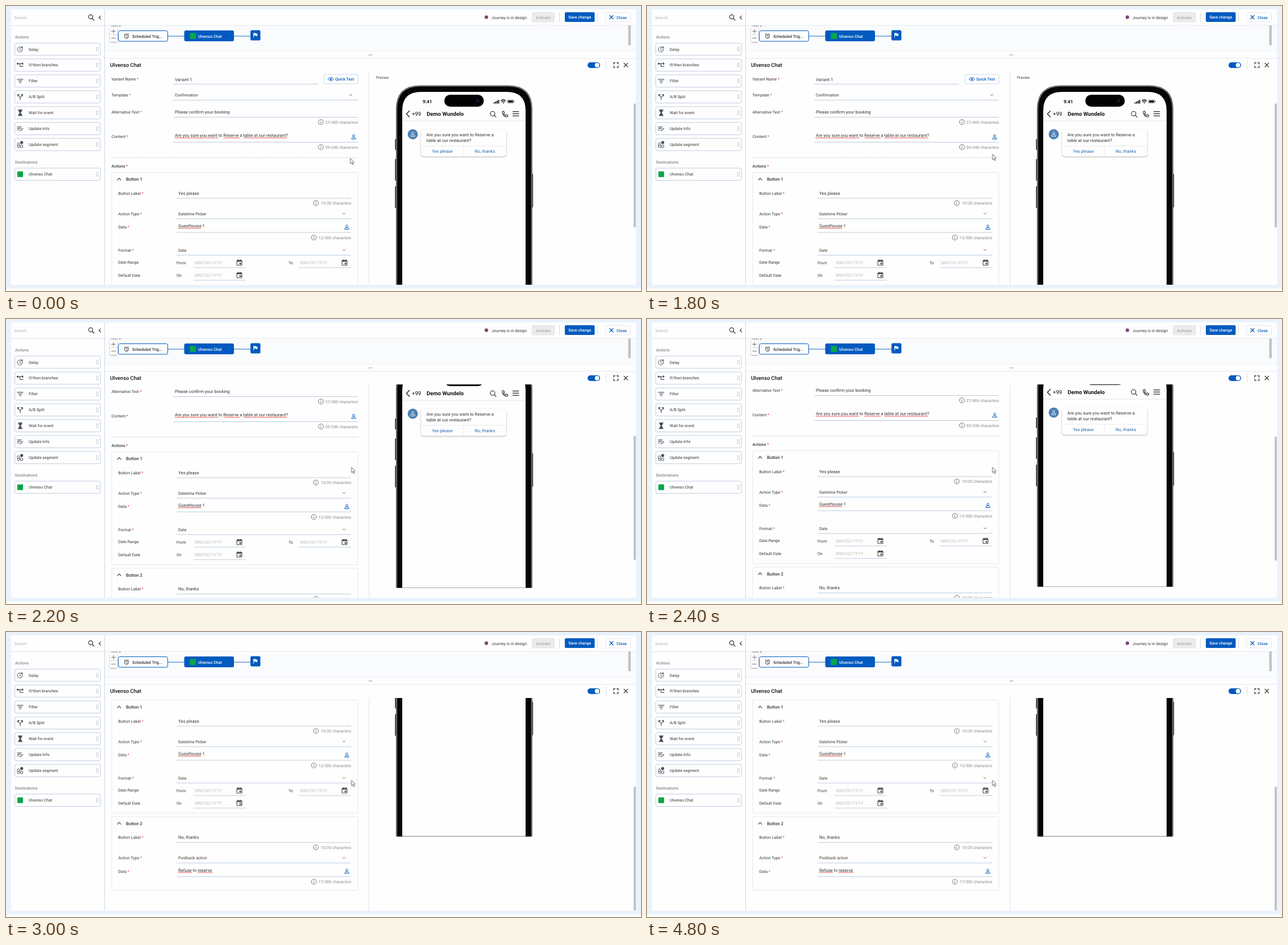
An HTML page that plays this animation: 1117x501 px, repeating every 5000 ms.

```html
<!DOCTYPE html>
<html lang="en">
<head>
<meta charset="utf-8">
<title>Journey editor</title>
<style>
  html, body { margin: 0; width: 100%; height: 100%; overflow: hidden; background: #eaf3fc; }
  svg { display: block; width: 1117px; height: 501px; text-rendering: geometricPrecision; }
  text { font-family: Roboto, sans-serif; fill: #333; white-space: pre; }
  .ln { fill: none; stroke-linecap: round; stroke-linejoin: round; }
</style>
</head>
<body>
<svg id="stage" viewBox="0 0 1117 501" xmlns="http://www.w3.org/2000/svg"></svg>
<script>
const BLUE = '#005abf', DARK = '#4a4f57', RULE = '#b4c7dc';
const LOOP = 5000;
const BRAND = 'Ulvenso Chat';

// y is the middle of the line of text
const text = (x, y, s, { size = 7.05, color = '#333', weight = 400, anchor = 'start' } = {}) =>
  `<text x="${x}" y="${y + size * 0.36}" font-size="${size}" font-weight="${weight}" text-anchor="${anchor}" style="fill:${color}">${s}</text>`;
const value = (x, y, s, color) => text(x, y, s, { size: 7.65, color });
const label = (x, y, s, weight) => text(x, y, `${s}<tspan style="fill:#e5343d"> *</tspan>`, { weight });
const rect = (x, y, w, h, fill, r = 0, stroke = 'none', extra = '') =>
  `<rect x="${x}" y="${y}" width="${w}" height="${h}" rx="${r}" fill="${fill}" stroke="${stroke}" ${extra}/>`;
const path = (d, color = DARK, w = 1, extra = '') =>
  `<path class="ln" d="${d}" stroke="${color}" stroke-width="${w}" ${extra}/>`;
const hline = (x1, x2, y, color = RULE) => rect(x1, y - 0.45, x2 - x1, 0.9, color);
const vline = (x, y1, y2, color) => rect(x - 0.5, y1, 1, y2 - y1, color);
const dash = (x, y1, y2) => path(`M${x} ${y1}V${y2}`, '#b8bec6', 0.9, 'stroke-dasharray="1.2 2.2"');
const circle = (x, y, r, fill, stroke = 'none', w = 1) =>
  `<circle cx="${x}" cy="${y}" r="${r}" fill="${fill}" stroke="${stroke}" stroke-width="${w}"/>`;
const at = (x, y, s) => `<g transform="translate(${x} ${y})">${s}</g>`;

const down = (x, y) => path(`M${x - 2} ${y - 1}l2 2l2 -2`, '#555', 0.95);
const up = (x, y) => path(`M${x - 3} ${y + 1.6}l3 -3.2l3 3.2`, '#333', 1.1);
const cross = (x, y, r, color, w) => path(`M${x - r} ${y - r}l${2 * r} ${2 * r}m0 ${-2 * r}l${-2 * r} ${2 * r}`, color, w);
const person = (x, y, color = BLUE) =>
  at(x, y, circle(0, -1.8, 1.8, 'none', color, 1) + path('M-3.5 3.6v-1q0 -1.5 3.5 -1.5t3.5 1.5v1z', color, 1));
const counter = (icon, right, y, s) =>
  circle(icon, y, 4.4, 'none', '#666', 0.9) + rect(icon - 0.5, y - 0.5, 1, 2.8, '#666') + rect(icon - 0.5, y - 2.3, 1, 1, '#666') +
  text(right, y, `${s} characters`, { color: '#868686', anchor: 'end' });
const calendar = (x, y) => at(x, y,
  rect(-4.4, -4, 8.8, 8.8, 'none', 1, '#444', 'stroke-width="1.1"') + rect(-4.4, -4, 8.8, 2.4, '#444') +
  rect(-3, -5.4, 1.2, 2, '#444') + rect(1.8, -5.4, 1.2, 2, '#444') + rect(0.2, 0.4, 2.8, 2.8, '#444'));
const squiggle = (x1, x2, y) =>
  path(`M${x1} ${y}` + 'l1 -1.3l1 1.3'.repeat(Math.round((x2 - x1) / 2)), '#e8372c', 0.75);
const select = (y, x1, x2, tx, s) => text(tx, y, s) + down(x2 - 12.5, y) + hline(x1, x2, y + 9);

const icons = [
  circle(-0.6, 0.4, 4.4, 'none', DARK) + path('M-0.6 -2v2.6l2 1.2M3 -5v3M1.5 -3.5h3'),
  path('M-5 -2.6h10M-5 -2.6h3q1.5 0 1.5 2.8t1.5 2.2h4M3.6 -4.2l1.6 1.6l-1.6 1.6', DARK, 1.2) + rect(-6, -4, 2.8, 2.8, DARK),
  path('M-5 -3h10M-3 0h6M-1.2 3h2.4', DARK, 1.3),
  path('M0 5V1.5L-4.2 -4M0 1.5L4.2 -4M-4.2 -1.4v-2.8h2.6M4.2 -1.4v-2.8h-2.6', DARK, 1.2),
  path('M-3.5 -5h7M-3.5 5h7', DARK, 1.3) + `<path d="M-2.8 -5h5.6v2.5L.8 0L2.8 2.5V5h-5.6V2.5L-.8 0L-2.8 -2.5z" fill="${DARK}"/>`,
  path('M-5 -3h7M-5 -0.3h6M-5 2.4h3M0 4l4.6 -4.4', DARK, 1.2),
  circle(2.6, -3.6, 2.6, DARK) + circle(-3, -0.8, 2.2, 'none', DARK) + circle(-2.8, 3.2, 2.2, 'none', DARK) + circle(2.4, 3.2, 2.4, 'none', DARK),
  rect(-5, -5, 10, 10, '#0aa64a', 1)
];
const item = (y, s, icon) => {
  let grip = '';
  for (let i = 0; i < 8; i++) grip += rect(158.9 + (i % 2) * 2.6, y - 3.9 + (i >> 1) * 2.2, 1.2, 1.2, '#a9b0b8');
  return rect(15.5, y - 10.8, 150.5, 21.6, '#fefefe', 2.5, '#b7c9de', 'stroke-width=".9"') + at(25, y, icon) + text(40, y, s) + grip;
};

function sidebar() {
  const names = ['Delay', 'If/then branches', 'Filter', 'A/B Split', 'Wait for event', 'Update Info', 'Update segment'];
  return text(14.5, 20.5, 'Search', { color: '#b4b4b4' }) +
    circle(149, 19, 3.6, 'none', '#333', 1.2) + path('M151.8 21.8l3.2 3.2', '#333', 1.3) + path('M166.3 17.4l-2.7 2.8l2.7 2.8', '#333', 1.2) +
    hline(9, 173, 34.5, '#d5dfea') +
    text(16, 54.5, 'Actions', { color: '#666' }) + text(16, 274, 'Destinations', { color: '#666' }) +
    names.map((s, i) => item(76 + i * 27.92, s, icons[i])).join('') + item(295.8, BRAND, icons[7]) +
    vline(173.5, 6, 490, '#d0d7e0');
}

function topBar() {
  const bold = { weight: 500 };
  return circle(845, 19.7, 3.1, '#7a4a72') + text(854, 20, 'Journey is in design') +
    rect(925.5, 11.5, 39, 16.5, '#ececec', 2, '#dcdcdc', 'stroke-width=".8"') + text(945, 20, 'Activate', { weight: 500, color: '#a8a8a8', anchor: 'middle' }) +
    dash(973.5, 12, 27) + rect(983, 11, 52.5, 17, BLUE, 2) + text(1009.3, 19.8, 'Save change', { weight: 500, color: '#fff', anchor: 'middle' }) +
    dash(1040.5, 12, 27) + rect(1054.5, 11.5, 44, 16.5, '#fefefe', 2, '#dbe4ee', 'stroke-width=".8"') +
    cross(1065, 19.8, 3, BLUE, 1.3) + text(1074, 20, 'Close', { ...bold, color: BLUE });
}

function flow() {
  return rect(174, 34, 934, 46, '#fafbfd') + hline(174, 1108, 34, '#e2e7ee') +
    `<g clip-path="url(#flowClip)">${text(183, 33.6, 'Test 8')}</g>` +
    hline(284, 314, 53, BLUE) + hline(400, 430, 53, BLUE) +
    rect(183, 38, 12.5, 25, '#fefefe', 1.5, 'none', 'filter="url(#soft)"') + hline(184, 194.5, 50.4, '#ccc') +
    path('M185.6 44.4h7M189.1 40.9v7M185.6 56.4h7', '#666', 0.9) +
    rect(197.5, 43.5, 87, 18.5, '#fefefe', 3, BLUE) + circle(212, 53.3, 3.5, 'none', '#333') + path('M212 51.3v2.2l1.4 .9M208.2 50l1.8 -1.6M215.8 50l-1.8 -1.6', '#333', 0.9) +
    text(222, 53, 'Scheduled Trig...', { weight: 500 }) +
    rect(313.5, 43, 87.5, 19, BLUE, 3) + rect(323.5, 47.5, 10.5, 10.5, '#0aa64a', 1) + text(338, 53, BRAND, { weight: 500, color: '#fff' }) +
    rect(430, 42.5, 17.5, 18, BLUE, 2.5) + path('M435.7 55v-7', '#fff', 1) + '<path d="M435.7 47.6h3.4l.4 .9h2.7v4.2h-3l-.5 -.9h-3z" fill="#fff"/>' +
    rect(1094.5, 34, 4.5, 35, '#c3c3c3', 1) +
    hline(174, 1108, 80, '#eceff3') + hline(174, 1108, 92, '#dde3ea') +
    [638.7, 641, 643.3].map(x => circle(x, 86, 0.7, '#666')).join('');
}

function panelHead() {
  return text(183, 104, BRAND, { size: 9.3, weight: 500, color: '#111' }) +
    rect(1023, 99, 22, 10, BLUE, 5) + circle(1039.6, 104, 3.9, '#fff') + dash(1055.5, 97, 111) +
    path('M1069 102v-2.3h2.4M1074.4 99.7h2.4v2.3M1076.8 105.5v2.6h-2.4M1071.4 108.1h-2.4v-2.6', '#444', 1.4) + cross(1090.3, 103.8, 3.2, '#444', 1.4) +
    vline(638.5, 116, 490, '#dfe4ea');
}

function card(y, h, n, caption, type, data, marks, count) {
  const dateBox = (x, icon, dy) => value(x, dy, 'MM/DD/YYYY', '#c0c0c0') + calendar(icon, dy) + hline(x - 2, icon + 11.5, dy + 9);
  const dates = n === 1
    ? label(197.5, 137, 'Format') + select(137, 300, 607, 303, 'Date') +
      text(197.5, 158.5, 'Date Range') + text(300, 159, 'From') + dateBox(332, 410.5, 159) + text(497, 159, 'To') + dateBox(517, 595.5, 159) +
      text(197.5, 181, 'Default Date') + text(300, 181, 'On') + dateBox(332, 410.5, 181)
    : '';
  return at(0, y, rect(186, 0.5, 433, h, 'none', 2, '#e1e6ec', 'stroke-width=".9"') +
    up(199, 12.3) + text(211, 12.5, `Button ${n}`, { size: 7.6, weight: 500 }) +
    label(197.5, 37, 'Button Label') + value(303, 37, caption) + hline(300, 607, 46) + counter(545, 607.5, 54.5, '10/20') +
    label(197.5, 73, 'Action Type') + select(73, 300, 607, 303, type) +
    label(197.5, 96.5, 'Data') + value(303, 94.5, data) + marks.map(([a, b]) => squiggle(a, b, 99.3)).join('') +
    person(599.5, 96.5) + hline(300, 607, 106) + counter(541.5, 607.5, 115, count) + dates);
}

function form() {
  return label(185.5, 128.5, 'Variant Name') + value(297, 129, 'Variant 1') + hline(294, 549, 137.3) +
    rect(559, 120.3, 60, 16.5, '#fefefe', 2, '#c6d5e6', 'stroke-width=".9"') +
    path('M566.7 128.5q4.8 -6.4 9.6 0q-4.8 6.4 -9.6 0z', BLUE, 1) + circle(571.5, 128.5, 1.6, BLUE) + text(579, 128.5, 'Quick Test', { weight: 500, color: BLUE }) +
    label(185.5, 156.5, 'Template') + select(156.5, 294, 619, 297, 'Confirmation') +
    label(185.5, 186.5, 'Alternative Text') + value(297, 186.5, 'Please confirm your booking') + hline(294, 619, 195.5) + counter(554, 619.5, 204, '27/400') +
    label(185.5, 229.5, 'Content') + value(297, 227.5, 'Are you sure you want to Reserve a table at our restaurant?') +
    [[297, 373], [383, 411], [418, 494]].map(([a, b]) => squiggle(a, b, 232.5)).join('') +
    person(611.5, 230) + hline(294, 619, 239.5) + counter(554, 619.5, 248, '59/240') +
    path('M186 266.7H619', '#c2c7cd', 0.9, 'stroke-dasharray="2.2 2.6"') + label(185.5, 281.5, 'Actions', 500) +
    card(292, 198.5, 1, 'Yes please', 'Datetime Picker', 'Guesthouse 1', [[303, 343]], '12/300') +
    card(496.5, 129, 2, 'No, thanks', 'Postback action', 'Refuse to reserve', [[303, 327], [337, 362]], '17/300');
}

function phone() {
  const body = (x1, x2, top, r) => `M${x1} 531.5V${top + r}Q${x1} ${top} ${x1 + r} ${top}H${x2 - r}Q${x2} ${top} ${x2} ${top + r}V531.5z`;
  const shell = (x1, x2, top, r, fill) => `<path d="${body(x1, x2, top, r)}" fill="${fill}"/>`;
  const key = (x, y, h) => rect(x, y, 3, h, '#4d4850', 1);
  const head = { size: 9.6, weight: 500, color: '#111' };
  const link = { size: 7.65, color: '#2467b3', anchor: 'middle' };
  return text(651, 125.5, 'Preview', { size: 6.4 }) +
    key(684.2, 234, 19) + key(684.2, 269, 38) + key(684.2, 317, 38) + key(924.2, 295, 59) +
    shell(686, 925.8, 139.5, 42, '#4b494f') + shell(687, 924.8, 140.6, 41, '#8d8b90') + shell(688, 923.8, 141.6, 40, '#050505') + shell(697, 914, 151, 33, '#fefefe') +
    rect(771, 156, 69.5, 21, '#020202', 10.5) + circle(829.5, 166.5, 3.2, '#11132b') +
    text(733, 168, '9:41', { size: 8.2, weight: 700, color: '#111' }) +
    [0, 1, 2, 3].map(i => rect(857.5 + i * 2.7, 169.4 - i * 1.5, 1.9, 2.2 + i * 1.5, '#111', 0.5)).join('') +
    path('M870.8 166.6q4 -3.6 8 0M872.3 168.5q2.5 -2.2 5 0', '#111', 1.3) + circle(874.8, 170.3, 1, '#111') +
    rect(881.8, 164.8, 11.6, 6.2, 'none', 2, '#777', 'stroke-width=".7"') + rect(883, 166, 9.2, 3.8, '#111', 1) + rect(894.2, 166.8, 0.9, 2.2, '#777') +
    path('M709.5 184.5l-5.2 5.3l5.2 5.3', '#222', 1.4) + text(714, 190, '+99', { ...head, weight: 400 }) + text(740, 190, 'Demo Wundelo', { ...head, weight: 700 }) +
    circle(856, 189.2, 4, 'none', '#222', 1.1) + path('M859 192.2l3 3', '#222', 1.2) +
    path('M873.5 185.2l2 -.4l1.3 2.9l-1.4 1.3q1 2.2 3.2 3.3l1.4 -1.4l2.6 1.2l-.3 2.2q-.3 .8 -1.3 .7q-7.4 -1 -8.1 -8.6q0 -.9 .6 -1.2z', '#222', 1.1) +
    path('M891.5 185.6h10.4M891.5 189.4h10.4M891.5 193.2h10.4', '#222', 1.2) + hline(697, 914, 202, '#e0e0e0') +
    circle(715.5, 225.5, 9, '#4f80b3') + person(715.5, 225.3, '#e3ecf5') +
    rect(730, 217.3, 150, 47, '#fefefe', 5, 'none', 'filter="url(#soft)"') +
    value(739.5, 226.3, 'Are you sure you want to Reserve a') + value(739.5, 235.8, 'table at our restaurant?') +
    hline(730, 880, 246, '#e6e6e6') + vline(805, 246, 264, '#e9e9e9') +
    text(767.5, 254.8, 'Yes please', link) + text(842.3, 254.8, 'No, thanks', link);
}

document.getElementById('stage').innerHTML =
  `<defs>
    <clipPath id="flowClip"><rect x="174" y="34.4" width="934" height="46"/></clipPath>
    <clipPath id="bodyClip"><rect x="174" y="115.5" width="929" height="374.5"/></clipPath>
    <filter id="soft" x="-20%" y="-20%" width="140%" height="150%"><feDropShadow dx="0" dy="1" stdDeviation="1.3" flood-opacity=".38"/></filter>
  </defs>` +
  rect(0, 0, 1117, 501, '#eaf3fc') + rect(0, 496.5, 1117, 4.5, '#fdfdfa') + rect(9, 6, 1099, 484, '#fefefe') +
  sidebar() + topBar() + flow() + panelHead() +
  `<g clip-path="url(#bodyClip)"><g id="content">${form()}${phone()}</g></g>` +
  `<g id="thumb">${rect(1104, 171.5, 4, 217.5, '#c3c3c3', 1)}</g>` +
  '<g id="cursor"><path d="M0 0V9.4L2.2 7.5L3.8 11.2L5.3 10.5L3.7 7L6.6 6.7z" fill="#fefefe" stroke="#444" stroke-width=".8" stroke-linejoin="round"/></g>';

// Each step is [time, x, y] and holds until the next one
function play(id, steps) {
  const last = steps[steps.length - 1];
  const frames = [...steps, [LOOP, last[1], last[2]]].map(([t, x, y]) => (
    { offset: t / LOOP, transform: `translate(${x}px, ${y}px)`, easing: 'steps(1, end)' }));
  document.getElementById(id).animate(frames, { duration: LOOP, iterations: Infinity });
}

const scroll = [[0, 0], [2000, 58], [2200, 59], [2400, 61], [2600, 116], [2800, 118], [3000, 172.5]];
play('content', scroll.map(([t, y]) => [t, 0, -y]));
play('thumb', scroll.map(([t, y]) => [t, 0, y * 0.582]));
play('cursor', [[0, 605.7, 267.8], [800, 606.5, 265], [1000, 607.7, 260.6]]);
</script>
</body>
</html>
```
